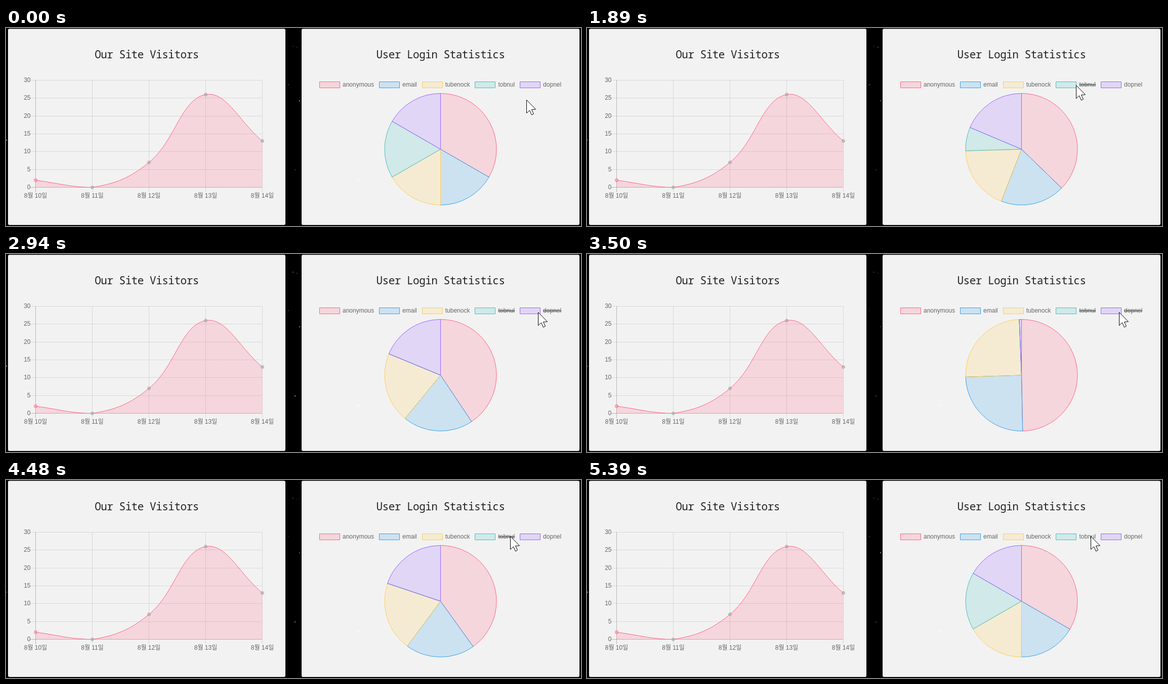
Animation, 1136 px wide and 392 px high, one loop 5460 ms. Source, as an HTML page with a canvas:

```html
<!DOCTYPE html>
<html lang="en">
<head>
<meta charset="utf-8">
<title>Site statistics</title>
<style>
  html, body { margin: 0; width: 100%; height: 100%; overflow: hidden; background: #000; }
  canvas { display: block; }
</style>
</head>
<body>
<canvas id="stage" width="1136" height="392"></canvas>
<script>
const ctx = document.getElementById('stage').getContext('2d');
const LOOP = 5460, STEP = 70, TAU = Math.PI * 2;
const SANS = '12px "Liberation Sans", Arial, "Noto Sans CJK KR", "Noto Sans CJK", sans-serif';
const MONO = '300 21px "Noto Sans Mono", monospace';

const RED = '255,99,132';
const parts = [
  { name: 'anonymous', rgb: RED, value: 2 },
  { name: 'email', rgb: '54,162,235', value: 1 },
  { name: 'tubenock', rgb: '255,206,86', value: 1 },
  { name: 'tobnul', rgb: '75,192,192', value: 1 },
  { name: 'dopnel', rgb: '153,102,255', value: 1 }
];
// Legend clicks: time and index of the toggled part
const clicks = [[1690, 3], [2924, 4], [3780, 4], [4600, 3]];
// Pointer keys: time, x, y
const pointer = [
  [0, 1028, 142], [280, 1028, 142], [840, 976, 113], [980, 976, 113], [1330, 966, 113],
  [2100, 966, 113], [2660, 1051, 115], [3850, 1051, 115], [4340, 996, 111],
  [4700, 996, 111], [4900, 995, 111], [LOOP, 995, 111]
];
// Faint specks behind and through the panels: x, y, size
const stars = [
  [558, 112, 1.5], [580, 144, 2], [571, 281, 2], [575, 38, 1.5], [1, 222, 2], [567, 36, 1.5],
  [531, 94, 3], [419, 223, 3], [696, 300, 4], [612, 213, 2], [220, 122, 2]
];

const tint = (rgb, a) => `rgba(${rgb},${a})`;

function text(str, x, y, align = 'left', font = SANS, color = '#666', spacing = '0px') {
  ctx.font = font;
  ctx.textAlign = align;
  ctx.letterSpacing = spacing;
  ctx.fillStyle = color;
  ctx.fillText(str, x, y);
}

function line(x1, y1, x2, y2, color, width = 1) {
  ctx.beginPath();
  ctx.moveTo(x1, y1);
  ctx.lineTo(x2, y2);
  ctx.strokeStyle = color;
  ctx.lineWidth = width;
  ctx.stroke();
}

function panel(x, w, title) {
  ctx.fillStyle = '#f2f2f2';
  ctx.beginPath();
  ctx.roundRect(x, 1.5, w, 388.5, 3);
  ctx.fill();
  text(title, x + w / 2, 60, 'center', MONO, '#222', '-0.5px');
}

function drawStars(t) {
  stars.forEach(([x, y, size], i) => {
    const glow = 0.35 + 0.2 * Math.sin(TAU * t / LOOP * (1 + i % 3) + i * 2);
    ctx.fillStyle = tint('255,255,255', glow);
    ctx.fillRect(x - size / 2, y - size / 2, size, size);
  });
}

const LEFT = 58.5, BOTTOM = 315.5, TOP = 103.5, GAP = 112;
const points = [2, 0, 7, 26, 13].map((v, i) => ({ x: LEFT + i * GAP, y: BOTTOM - v * (BOTTOM - TOP) / 30 }));

// Smoothed control points with tension 0.4, kept inside the plot
function handles(i) {
  const cur = points[i], prev = points[i - 1] || cur, next = points[i + 1] || cur;
  const a = Math.hypot(cur.x - prev.x, cur.y - prev.y);
  const b = Math.hypot(next.x - cur.x, next.y - cur.y);
  const at = k => ({
    x: Math.max(LEFT, Math.min(506.5, cur.x + k * (next.x - prev.x))),
    y: Math.max(TOP, Math.min(BOTTOM, cur.y + k * (next.y - prev.y)))
  });
  return [at(-0.4 * a / (a + b)), at(0.4 * b / (a + b))];
}

function tracePath() {
  ctx.beginPath();
  ctx.moveTo(points[0].x, points[0].y);
  for (let i = 1; i < points.length; i++) {
    const out = handles(i - 1)[1], into = handles(i)[0], p = points[i];
    ctx.bezierCurveTo(out.x, out.y, into.x, into.y, p.x, p.y);
  }
}

function lineChart() {
  for (let v = 0; v <= 30; v += 5) {
    const y = Math.floor(BOTTOM - v * (BOTTOM - TOP) / 30) + 0.5;
    line(48, y, 506, y, tint('0,0,0', v ? 0.1 : 0.25));
    text(v, 48.5, y + 3, 'right');
  }
  points.forEach((p, i) => {
    line(p.x, 103, p.x, 325, tint('0,0,0', i ? 0.1 : 0.25));
    text(`8월 ${10 + i}일`, p.x, 336, 'center');
  });
  tracePath();
  ctx.lineTo(506.5, BOTTOM);
  ctx.lineTo(LEFT, BOTTOM);
  ctx.fillStyle = tint(RED, 0.2);
  ctx.fill();
  tracePath();
  ctx.strokeStyle = tint(RED, 1);
  ctx.lineWidth = 1;
  ctx.stroke();
  points.forEach((p, i) => {
    ctx.beginPath();
    ctx.arc(p.x, p.y, 3, 0, TAU);
    ctx.fillStyle = i ? 'rgba(170,170,170,.6)' : tint(RED, 0.2);
    ctx.strokeStyle = i ? 'rgba(150,150,150,.6)' : tint(RED, 1);
    ctx.fill();
    ctx.stroke();
  });
}

// Share of each part once the first n clicks are done
function shares(n) {
  const hidden = parts.map((_, i) => clicks.slice(0, n).filter(c => c[1] === i).length % 2 === 1);
  const total = parts.reduce((sum, p, i) => sum + (hidden[i] ? 0 : p.value), 0);
  return { hidden, share: parts.map((p, i) => hidden[i] ? 0 : p.value / total) };
}

function pieChart(t) {
  const n = clicks.filter(c => c[0] <= t).length;
  const { hidden, share } = shares(n);
  const before = shares(Math.max(0, n - 1)).share;
  const k = n ? 1 - (1 - Math.min(1, (t - clicks[n - 1][0]) / 1000)) ** 4 : 1;

  let x = 619, angle = -Math.PI / 2;
  ctx.lineJoin = 'bevel';
  parts.forEach((p, i) => {
    const end = angle + TAU * (before[i] + (share[i] - before[i]) * k);
    ctx.fillStyle = tint(p.rgb, 0.2);
    ctx.strokeStyle = tint(p.rgb, 1);
    ctx.lineWidth = 1;
    ctx.beginPath();
    ctx.arc(858.5, 240, 110.5, angle, end);
    ctx.lineTo(858.5, 240);
    ctx.closePath();
    ctx.fill();
    ctx.stroke();
    angle = end;

    const left = Math.round(x) + 0.5;
    ctx.fillRect(left, 106.5, 40, 12);
    ctx.strokeRect(left, 106.5, 40, 12);
    text(p.name, x + 46, 116);
    const w = ctx.measureText(p.name).width;
    if (hidden[i]) line(x + 46, 112.5, x + 46 + w, 112.5, '#666', 2);
    x += w + 56;
  });
}

function drawPointer(t) {
  const i = pointer.findIndex(p => p[0] > t);
  const [t0, x0, y0] = pointer[i - 1], [t1, x1, y1] = pointer[i];
  const u = (t - t0) / (t1 - t0), k = u * u * (3 - 2 * u);
  ctx.save();
  ctx.translate(Math.round(x0 + (x1 - x0) * k) + 0.5, Math.round(y0 + (y1 - y0) * k) + 0.5);
  const arrow = new Path2D('M0 0V26L6 20.5L10 29.5L14 27.5L10 19L18 18.5Z');
  ctx.fillStyle = '#fff';
  ctx.strokeStyle = '#000';
  ctx.lineWidth = 1;
  ctx.lineJoin = 'miter';
  ctx.fill(arrow);
  ctx.stroke(arrow);
  ctx.restore();
}

function frame(now) {
  const t = Math.floor(now % LOOP / STEP) * STEP;
  ctx.fillStyle = '#000';
  ctx.fillRect(0, 0, 1136, 392);
  panel(4, 548, 'Our Site Visitors');
  panel(584, 549, 'User Login Statistics');
  drawStars(t);
  lineChart();
  pieChart(t);
  drawPointer(t);
  requestAnimationFrame(frame);
}
requestAnimationFrame(frame);
</script>
</body>
</html>
```
